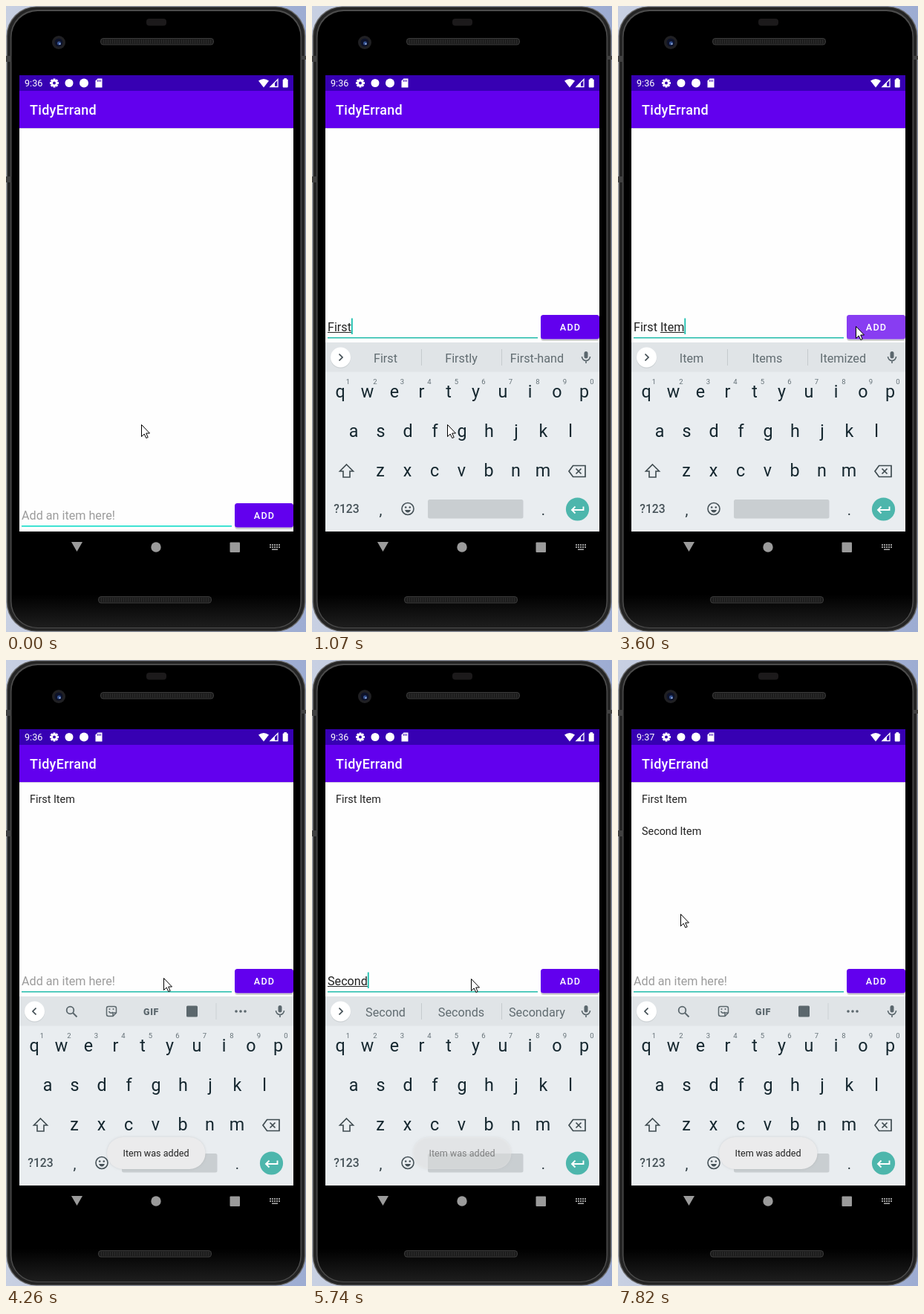
Animation of 404x841 px, one loop 8000 ms. Source, as an HTML page with a canvas:

```html
<!DOCTYPE html>
<html lang="en">
<head>
<meta charset="utf-8">
<title>Todo list demo</title>
<style>
html, body { margin: 0; width: 100%; height: 100%; overflow: hidden; background: #000; }
canvas { display: block; width: 404px; height: 841px; }
</style>
</head>
<body>
<canvas id="stage" width="404" height="841"></canvas>
<script>
const ctx = document.getElementById('stage').getContext('2d');
const LOOP = 8000;
const FONT = 'Roboto, sans-serif';
const TEAL = '#03dac5', PURPLE = '#6200ee', ICON = '#5b676d';

// Step tracks: [start in ms, value]
const typed = [
  [0, ''], [550, 'F'], [800, 'Fi'], [950, 'Firs'], [1070, 'First'], [1190, 'First '],
  [2120, 'First It'], [2270, 'First Ite'], [2390, 'First Item'], [3720, ''],
  [5080, 'S'], [5200, 'Se'], [5350, 'Sec'], [5470, 'Seco'], [5590, 'Secon'],
  [5740, 'Second'], [5860, 'Second '], [6010, 'Second I'], [6280, 'Second Item'], [7280, '']
];
const caretOn = [
  [0, 0], [550, 1], [1690, 0], [2120, 1], [2820, 0], [3330, 1], [4260, 0],
  [4500, 1], [6740, 0], [7280, 1], [7820, 0]
];
const pointer = [
  [0, [182, 562]], [2940, [262, 508]], [3060, [352, 452]], [3180, [319, 431]],
  [3330, [320, 430]], [3720, [286, 429]], [3840, [236, 428]], [3990, [214, 427]],
  [4110, [212, 427]], [4500, [213, 427]], [4650, [214, 428]], [5860, [219, 428]],
  [6860, [266, 409]], [7010, [335, 441]], [7550, [190, 412]], [7670, [38, 385]],
  [7820, [84, 341]]
];
const toastAlpha = [
  [0, 0], [3840, 0.35], [3990, 0.85], [4110, 1], [5590, 0.85], [5740, 0.5],
  [5860, 0.3], [6010, 0.1], [6130, 0], [7400, 0.35], [7550, 0.85], [7670, 1]
];
const ripple = [
  [0, 0], [3480, 0.12], [3600, 0.24], [3720, 0.12], [3840, 0],
  [7160, 0.24], [7280, 0.2], [7400, 0.1], [7550, 0]
];
const suggestions = {
  'F': ['F', 'For', 'Fri'], 'Fi': ['Fi', 'First', 'Fine'], 'Firs': ['Firs', 'First', 'Fits'],
  'First': ['First', 'Firstly', 'First-hand'], 'I': ['I', 'I\'m', 'It'],
  'It': ['It', 'It\'s', 'Its'], 'Ite': ['Ite', 'Item', 'Items'],
  'Item': ['Item', 'Items', 'Itemized'], 'S': ['S', 'So', 'See'], 'Se': ['Se', 'See', 'Set'],
  'Sec': ['Sec', 'Second', 'Secret'], 'Seco': ['Seco', 'Second', 'Seconds'],
  'Secon': ['Secon', 'Second', 'Seconds'], 'Second': ['Second', 'Seconds', 'Secondary'],
  '': ['time', 'of', 'and']
};

function at(track, t) {
  let value = track[0][1];
  for (const [start, next] of track) if (t >= start) value = next;
  return value;
}

function rect(x, y, w, h, color, r = 0) {
  ctx.fillStyle = color;
  ctx.beginPath();
  ctx.roundRect(x, y, w, h, r);
  ctx.fill();
}

function disc(x, y, r, color) {
  ctx.fillStyle = color;
  ctx.beginPath();
  ctx.arc(x, y, r, 0, 7);
  ctx.fill();
}

function ring(x, y, r, color, width) {
  ctx.strokeStyle = color;
  ctx.lineWidth = width;
  ctx.beginPath();
  ctx.arc(x, y, r, 0, 7);
  ctx.stroke();
}

function shape(d, x, y, fill, stroke, width = 1.6) {
  const path = new Path2D(d);
  ctx.save();
  ctx.translate(x, y);
  if (fill) { ctx.fillStyle = fill; ctx.fill(path); }
  if (stroke) { ctx.strokeStyle = stroke; ctx.lineWidth = width; ctx.stroke(path); }
  ctx.restore();
}

function text(str, x, y, size, color, align = 'left', weight = 400, spacing = 0) {
  ctx.font = `${weight} ${size}px ${FONT}`;
  ctx.letterSpacing = spacing + 'px';
  ctx.textAlign = align;
  ctx.fillStyle = color;
  ctx.fillText(str, x, y);
  const width = ctx.measureText(str).width;
  ctx.letterSpacing = '0px';
  return width;
}

function speaker(x, y) {
  rect(x, y, 153, 9.5, '#3b3b3b', 4.5);
  rect(x + 1, y + 1, 151, 7.5, '#1d1d1d', 3.5);
  for (let i = 4; i < 149; i += 3) rect(x + i, y + 2, 1, 5.5, '#2c2c2c');
}

function drawDevice() {
  const backdrop = ctx.createLinearGradient(0, 0, 404, 0);
  backdrop.addColorStop(0, '#c8d0e2');
  backdrop.addColorStop(1, '#9dacd2');
  rect(0, 0, 404, 841, backdrop);
  rect(0.5, 0.5, 403, 840, '#686868', 40);
  rect(2, 1.5, 400, 838, '#242424', 39);
  rect(6, 5, 392, 831, '#4c4c4c', 36);
  const glass = ctx.createLinearGradient(0, 0, 0, 841);
  glass.addColorStop(0, '#000');
  glass.addColorStop(0.94, '#000');
  glass.addColorStop(0.99, '#1c1c1c');
  rect(7.5, 7, 389, 828, glass, 35);
  for (const y of [67, 229]) rect(0, y, 7, 8, '#414141');
  rect(397, 67, 7, 5, '#414141');

  rect(189, 17, 27, 9.5, '#1c1a1b', 4);
  disc(71, 49, 9, '#202023');
  disc(71, 49, 5.5, '#0d1228');
  disc(71.5, 50, 2.5, '#33508f');
  disc(72.5, 51, 1, '#b4c8ee');
  speaker(127, 43);
  speaker(124, 793);
}

function drawNavBar() {
  rect(18, 706, 369, 42, '#000');
  const grey = '#9b9b9b';
  shape('M-7.5-6.5H7.5L0 6.5Z', 95.5, 726.5, grey);
  disc(202, 727, 6.7, grey);
  rect(301.5, 720.5, 13.5, 13.5, grey, 1);
  for (let row = 0; row < 2; row++)
    for (let i = 0; i < 5; i++) rect(355 + i * 3, 723 + row * 3, 2, 2, grey);
  rect(358, 729.3, 8, 1.7, grey);
}

function drawBars(t) {
  rect(18, 93, 369, 21, '#3700b3');
  text(t < 7550 ? '9:36' : '9:37', 25, 108, 12.6, '#fff');
  for (let i = 0; i < 8; i++) {
    ctx.save();
    ctx.translate(65, 103.5);
    ctx.rotate(i * Math.PI / 4);
    rect(-1.5, -6, 3, 3, '#fff');
    ctx.restore();
  }
  ring(65, 103.5, 3.2, '#fff', 2.5);
  disc(85, 103.5, 5.5, '#fff');
  disc(105, 103.5, 6, '#fff');
  shape('M-1.5-6H4.5V6H-4.5V-3Z', 125, 103.5, '#fff');
  for (let i = 0; i < 3; i++) rect(122.8 + i * 2, 99.3, 1, 2.5, '#3700b3');
  shape('M-7-3Q0-8 7-3L0 6Z', 347, 103.5, '#fff');
  shape('M5-5V5H-5Z', 361, 103.5, null, '#fff', 1.3);
  shape('M1-1V5H-5Z', 361, 103.5, '#fff');
  rect(372.7, 98.5, 7, 11, '#fff', 1);
  rect(374.5, 97, 3.4, 2, '#fff');

  rect(18, 114, 369, 50, PURPLE);
  rect(18, 164, 369, 1, '#d9d5e0');
  text('TidyErrand', 32, 146, 18, '#fff', 'left', 500, 0.3);
}

function drawEntry(t, value, y) {
  const word = value.split(' ').pop();
  const baseline = y + 6;
  rect(21, y + 14, 283, 1.5, t < 150 ? TEAL : '#22bcab');
  let width = 0;
  if (value) {
    width = text(value, 21, baseline, 16.16, '#212121');
    const wordWidth = ctx.measureText(word).width;
    if (word) rect(21 + width - wordWidth, baseline + 1, wordWidth, 1, '#212121');
  } else {
    text('Add an item here!', 21, baseline, 16.16, '#9c9c9c');
  }
  if (at(caretOn, t)) rect(21 + width, y - 11.5, 1.8, 21.5, '#19bfae');

  rect(308, y - 14, 79, 33, 'rgba(0,0,0,0.18)', 4);
  rect(308, y - 16, 79, 32.5, PURPLE, 3.5);
  const glow = at(ripple, t);
  if (glow) rect(308, y - 16, 79, 32.5, `rgba(255,255,255,${glow})`, 3.5);
  text('ADD', 348, y + 5.2, 12.6, '#fff', 'center', 500, 1.15);
}

function drawMic() {
  rect(366.5, 464, 5, 9.5, ICON, 2.5);
  shape('M-5.5-1A5.5 5.5 0 0 0 5.5-1M0 4.5V8', 369, 472, null, ICON, 1.6);
}

function drawTools() {
  ring(86.5, 470.5, 4.8, ICON, 1.8);
  shape('M0 0L5.5 5.5', 90, 474, null, ICON, 2);
  shape('M-4-6.5H4Q6.5-6.5 6.5-4V2L2 6.5H-4Q-6.5 6.5-6.5 4V-4Q-6.5-6.5-4-6.5ZM6.5 2H2V6.5M-3.5 0Q-1 4 2 1', 142, 472, null, ICON, 1.5);
  disc(139.5, 469, 1, ICON);
  disc(144.5, 469, 1, ICON);
  text('GIF', 195.5, 476.5, 12.5, ICON, 'center', 900, 0.6);
  rect(243, 464.5, 15, 15, ICON, 1.5);
  rect(282.5, 461, 1, 22, '#ccd2d5');
  for (let i = -1; i < 2; i++) disc(316 + i * 6, 472, 1.8, ICON);
}

function drawSuggestions(value) {
  const word = value.split(' ').pop();
  suggestions[word].forEach((s, i) => text(s, 99 + i * 102, 478.5, 16.2, '#616c71', 'center'));
  rect(147, 461, 1, 22, '#c5cbce');
  rect(255, 461, 1, 22, '#c5cbce');
}

function drawKeyRow(letters, x, baseline) {
  [...letters].forEach((c, i) => text(c, x + i * 36.5, baseline, 23.3, '#15272f', 'center'));
}

function drawKeyboard(value) {
  rect(18, 452, 369, 254, '#e9edf0');
  rect(18, 452, 369, 39.5, '#e0e4e7');
  disc(38.5, 473, 13.7, '#cdd2d5');
  disc(38.5, 472, 13.5, '#fff');
  shape(value ? 'M-2-4.5L2.5 0L-2 4.5' : 'M2-4.5L-2.5 0L2 4.5', 38.5, 472, null, '#3e4a50', 1.7);
  if (value) drawSuggestions(value); else drawTools();
  drawMic();

  drawKeyRow('qwertyuiop', 38, 526);
  [...'1234567890'].forEach((c, i) => text(c, 48.5 + i * 36.5, 508, 9.5, '#657177', 'center'));
  drawKeyRow('asdfghjkl', 56, 578.5);
  drawKeyRow('zxcvbnm', 92, 631.5);

  shape('M0-9L9 0H4.5V8H-4.5V0H-9Z', 46.5, 625, null, '#3f4b50', 1.6);
  shape('M-5.5-7.5H11V7.5H-5.5L-11 0ZM-1.5-3.5L5.5 3.5M5.5-3.5L-1.5 3.5', 357, 625, null, '#3f4b50', 1.7);
  text('?123', 46.5, 681, 15.7, '#465258', 'center', 500);
  text(',', 92.5, 684, 20, '#29383e', 'center');
  text('.', 311.5, 684, 20, '#29383e', 'center');
  ring(129, 675.5, 8, '#465258', 1.6);
  disc(126.2, 673.5, 1.3, '#465258');
  disc(131.8, 673.5, 1.3, '#465258');
  shape('M-4 1.5H4Q2.5 5 0 5Q-2.5 5-4 1.5Z', 129, 675.5, '#465258');
  rect(156, 663, 128.5, 25.5, '#c9ced1', 2.5);
  disc(357.5, 676, 15.6, '#4db6ac');
  shape('M8-4.5V0H-7M-3-4.5L-7.5 0L-3 4.5', 357.5, 677, null, '#fff', 1.9);
}

function drawToast(alpha) {
  if (!alpha) return;
  ctx.globalAlpha = alpha;
  ctx.shadowColor = 'rgba(0,0,0,0.12)';
  ctx.shadowBlur = 3;
  rect(136, 641, 132.5, 43, '#ebebec', 21.5);
  ctx.shadowColor = 'transparent';
  text('Item was added', 202, 667, 12.57, '#222', 'center');
  ctx.globalAlpha = 1;
}

function drawPointer([x, y]) {
  shape('M.5.5V16.5L4.2 13L6.8 18.5L9.2 17.5L6.7 12H11.5Z', x, y, '#fff', '#000', 1);
}

function draw(t) {
  const value = at(typed, t);
  drawDevice();
  rect(18, 93, 369, 613, '#fefefe');
  drawBars(t);
  if (t >= 3720) text('First Item', 32, 191.7, 14.37, '#222');
  if (t >= 7280) text('Second Item', 32, 234.7, 14.37, '#222');
  drawEntry(t, value, t < 150 ? 684 : 431);
  drawNavBar();
  if (t >= 400) {
    ctx.save();
    ctx.translate(0, t < 550 ? 8 : 0);
    drawKeyboard(value);
    ctx.restore();
  }
  drawToast(at(toastAlpha, t));
  drawPointer(at(pointer, t));
}

const began = performance.now();
function tick() {
  draw((performance.now() - began) % LOOP);
  requestAnimationFrame(tick);
}
tick();
</script>
</body>
</html>
```
